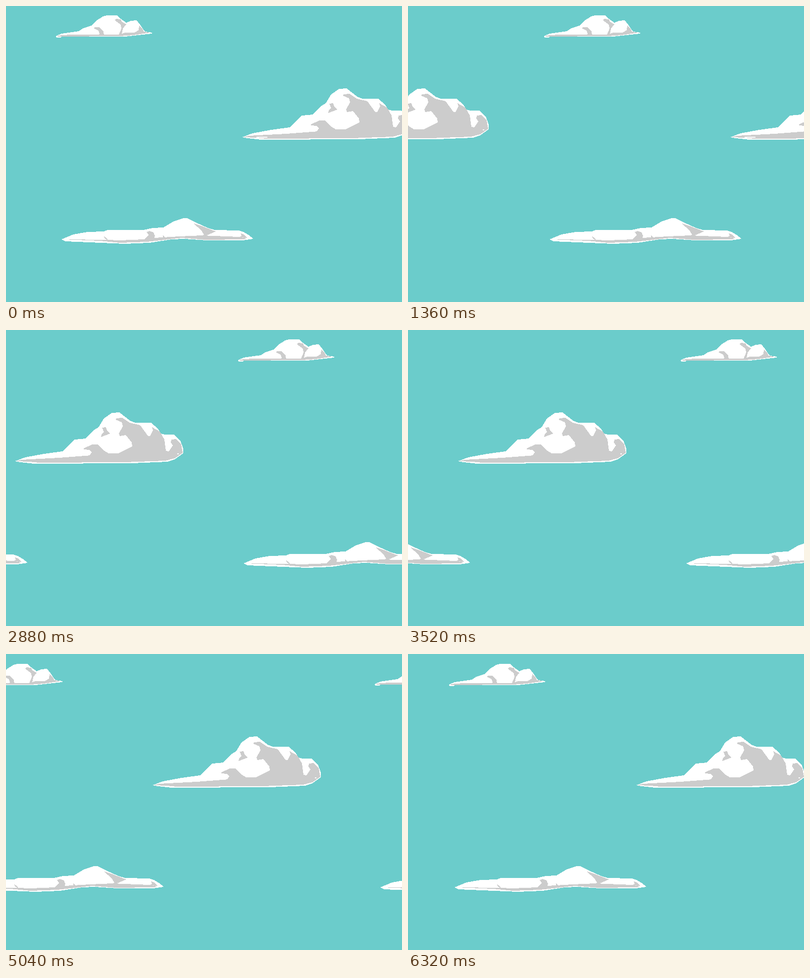
Animation of 800x600 px, one loop 6400 ms. Source, as an HTML page:

```html
<!DOCTYPE html>
<html lang="en">
<head>
<meta charset="utf-8">
<title>Drifting clouds</title>
<style>
html, body { margin: 0; width: 100%; height: 100%; overflow: hidden; background: #6bcccb; }
svg { display: block; width: 100%; height: 100%; }
.lit { fill: #fff; }
.shade { fill: #ccc; }
</style>
</head>
<body>
<svg viewBox="0 0 800 600" shape-rendering="crispEdges">
  <defs>
    <g id="small">
      <path class="lit" d="M101 61 112 56 147 51 156 45 172 40 182 30 196 21 204 19 224 19 232 26 243 34 252 30 264 29 271 38 277 47 281 52 295 54 295 56 240 62 112 62 111 64 102 64Z"/>
      <g class="shade">
        <path d="M103 60 130 58 228 58 240 54 258 54 279 52 291 54 258 59 230 61 105 62Z"/>
        <path d="M187 59 189 56 187 50 177 45 180 43 188 43 197 52 198 59Z"/>
        <path d="M228 58 233 46 232 38 220 29 222 26 232 27 234 32 243 37 236 46 234 57Z"/>
        <path d="M258 55 268 49 269 39 276 47 279 53Z"/>
      </g>
    </g>
    <g id="big">
      <path class="lit" d="M101 266 122 258 160 251 197 246 222 222 244 220 259 204 270 197 281 179 297 168 312 167 334 184 344 188 376 188 390 200 396 210 404 212 422 212 435 224 441 240 441 250 424 262 410 267 338 270 140 271 112 268Z"/>
      <g class="shade">
        <path d="M103 266 115 263 190 259 256 254 290 250 310 250 338 236 337 228 325 213 313 215 311 210 319 195 317 187 305 182 306 179 318 178 333 188 354 193 370 215 374 215 380 203 378 197 394 206 403 222 406 245 412 246 420 234 416 228 417 222 426 221 437 232 440 249 424 260 405 265 322 268 150 269 130 267Z"/>
        <path d="M250 257 256 248 252 243 240 242 240 240 257 232 268 232 280 244 292 251Z"/>
        <path d="M277 198 285 197 287 203 293 210 275 217 276 211 281 207Z"/>
      </g>
      <rect class="lit" x="429" y="250" width="3" height="2"/>
    </g>
    <g id="low">
      <path class="lit" d="M112 473 136 463 165 458 198 457 205 454 278 454 296 450 318 449 338 437 358 430 366 430 384 439 408 450 422 454 470 455 480 458 490 464 500 472 478 475 405 475 360 472 335 473 290 480 240 482 120 477Z"/>
      <g class="shade">
        <path d="M116 473 204 474 230 475 280 473 300 470 350 467 396 465 470 468 486 471 480 473 404 474 355 470 285 478 230 480 190 476Z"/>
        <path d="M198 467 204 471 206 475 199 471Z"/>
        <path d="M278 474 288 464 284 458 290 456 298 459 301 466 299 472Z"/>
        <path d="M317 465 321 469 317 470Z"/>
        <path d="M378 440 398 447 424 457 403 466 395 465 400 464 395 455Z"/>
        <path d="M474 461 480 463 488 470 470 469 476 466Z"/>
      </g>
    </g>
  </defs>
  <use href="#small"/>
  <use href="#small"/>
  <g><use href="#big"/><rect class="lit" x="130" y="265" width="22" height="2"/></g>
  <use href="#big"/>
  <use href="#low"/>
  <use href="#low"/>
</svg>
<script>
const LOOP = 6400, STEP = 80;
// start offset, pixels per step, vertical offset
const drift = [
  [0, 10.23, 0], [-821.5, 10.17, 1],
  [376, 10.23, 0], [-453, 10.29, 0],
  [0, 10.23, 0], [-822, 10.18, 0]
];
const clouds = document.querySelectorAll('svg > use, svg > g');

function draw(ms) {
  const n = Math.floor((ms % LOOP) / STEP);
  drift.forEach(([x, speed, y], i) => {
    clouds[i].setAttribute('transform', `translate(${Math.round(x + speed * n)} ${y})`);
  });
}

const start = performance.now();
function tick() {
  draw(performance.now() - start);
  requestAnimationFrame(tick);
}
tick();
</script>
</body>
</html>
```
